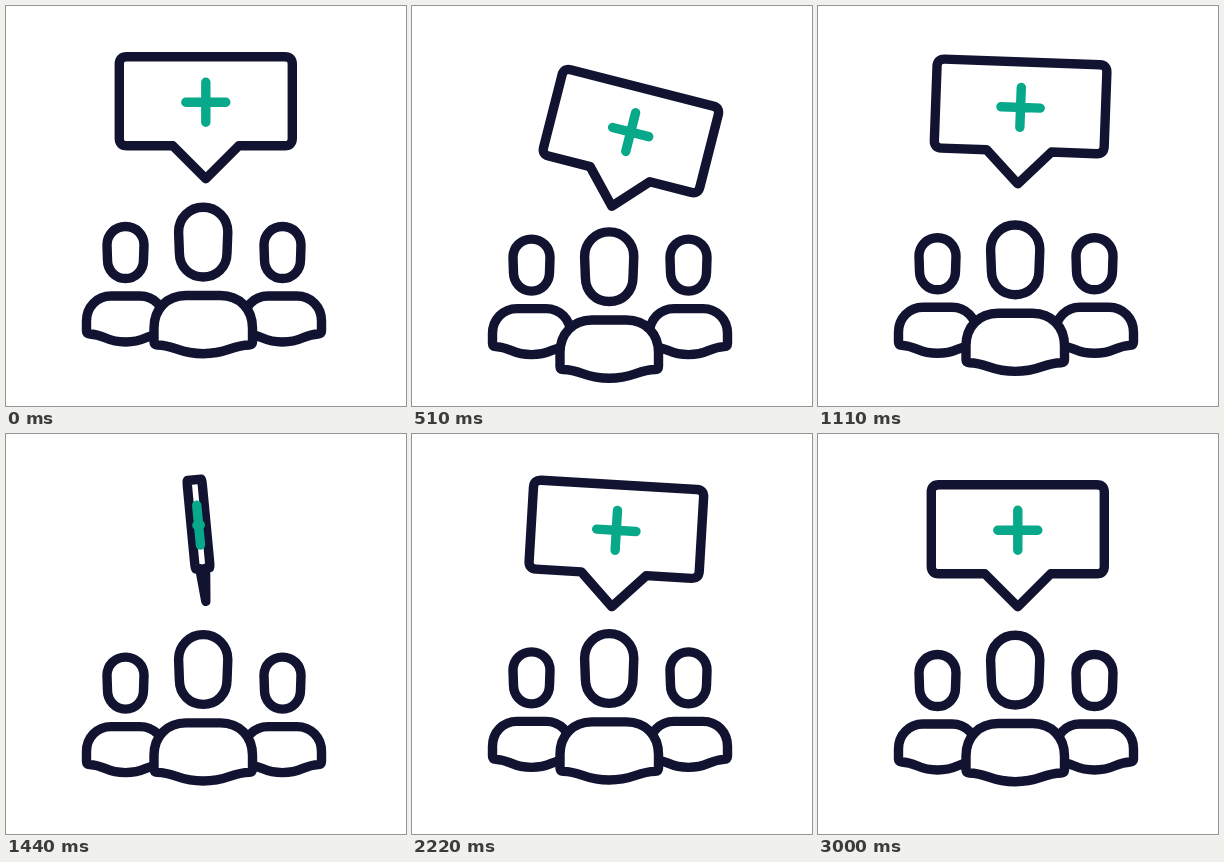
These frames come from a looping animation (400 px wide and 400 px high, 3090 ms). An HTML page:

```html
<!DOCTYPE html>
<html lang="en">
<head>
<meta charset="utf-8">
<title>Team health chat</title>
<style>
  html, body { margin: 0; width: 100%; height: 100%; overflow: hidden; background: #fff; }
  svg { display: block; width: 100%; height: 100%; }

  path { fill: #fff; stroke: #121331; stroke-width: 9.4; stroke-linecap: round; stroke-linejoin: round; }
  .plus { fill: none; stroke: #08a88a; }

  .lift, .tilt, .mid, .side, .bubble, .plus {
    animation: 3090ms cubic-bezier(.37, 0, .63, 1) infinite;
  }
  .lift { animation-name: lift; }
  .tilt { animation-name: tilt; }
  .mid { animation-name: mid; }
  .side { animation-name: side; }
  .bubble, .plus { animation-name: spin; d: var(--front); }

  /* Morphing to the mirrored outline turns the sign and keeps its line weight. */
  .bubble {
    --front: path("M-79 -122 L79 -122 Q86.5 -122 86.5 -114.5 L86.5 -40.5 Q86.5 -33 79 -33 L33 -33 L0 0 L-33 -33 L-79 -33 Q-86.5 -33 -86.5 -40.5 L-86.5 -114.5 Q-86.5 -122 -79 -122 Z");
    --back: path("M79 -122 L-79 -122 Q-86.5 -122 -86.5 -114.5 L-86.5 -40.5 Q-86.5 -33 -79 -33 L-33 -33 L0 0 L33 -33 L79 -33 Q86.5 -33 86.5 -40.5 L86.5 -114.5 Q86.5 -122 79 -122 Z");
  }
  .plus {
    --front: path("M-20 -76.5 L20 -76.5 M0 -96.5 L0 -56.5");
    --back: path("M20 -76.5 L-20 -76.5 M0 -96.5 L0 -56.5");
  }

  @keyframes spin {
    0% { d: var(--front); }
    18.77% { d: var(--back); }
    34.95% { d: var(--front); animation-timing-function: cubic-bezier(.15, 0, .2, 1); }
    76.7%, 100% { d: var(--back); }
  }
  @keyframes lift {
    0% { translate: 0 0; animation-timing-function: cubic-bezier(.3, 0, .3, 1); }
    11.65%, 17.48% { translate: 0 27.5px; }
    47.57%, 48.87% { translate: 0 -5.5px; }
    72.82%, 100% { translate: 0 0; }
  }
  @keyframes tilt {
    0% { rotate: 0deg; }
    16.83%, 19.09% { rotate: 14.3deg; }
    48.54%, 52.43% { rotate: -5.6deg; }
    76.7% { rotate: 4.3deg; }
    97.09%, 100% { rotate: 0deg; }
  }
  @keyframes mid {
    0% { translate: 0 0; }
    16.99% { translate: 0 24.6px; }
    27.83% { translate: 0 25px; }
    52.1%, 58.25% { translate: 0 -4.1px; }
    82.52%, 100% { translate: 0 0; }
  }
  @keyframes side {
    0% { translate: 0 0; }
    21.36%, 27.18% { translate: 0 14.3px; }
    60.19%, 63.11% { translate: 0 -4px; }
    85.44%, 100% { translate: 0 0; }
  }
</style>
</head>
<body>
<svg viewBox="0 0 400 400">
  <defs>
    <g id="person">
      <path d="M-18.5 239 C-18.5 228.5 -10.5 220.5 0 220.5 S18.5 228.5 18.5 239 L18 254 C18 264.5 10 272.5 0 272.5 S-18 264.5 -18 254 Z"/>
      <path d="M-39 315 C-39 301 -28.5 290 -14.5 290 H14.5 C28.5 290 39 301 39 315 V325 Q39 328 36 328 C20 328.5 20 336 0 336 S-20 328.5 -36 328 Q-39 328 -39 325 Z"/>
    </g>
  </defs>

  <g class="side">
    <use href="#person" x="119.5"/>
    <use href="#person" x="276.5"/>
  </g>

  <g class="mid">
    <path d="M172.6 226 C172.6 212 183.5 201.3 197.2 201.3 S221.8 212 221.8 226 L221 247 C221 261 210.5 271 197.2 271 S173.4 261 173.4 247 Z"/>
    <path d="M148 322 C148 303 161 289.5 180 289.5 H214.5 C233.5 289.5 246.5 303 246.5 322 V336 Q246.5 339 243.5 339 C224 339.5 222 347.7 197.2 347.7 S170.5 339.5 151 339 Q148 339 148 336 Z"/>
  </g>

  <g transform="translate(199.8 172.7)">
    <g class="lift">
      <g class="tilt">
        <path class="bubble"/>
        <path class="plus"/>
      </g>
    </g>
  </g>
</svg>
</body>
</html>
```
